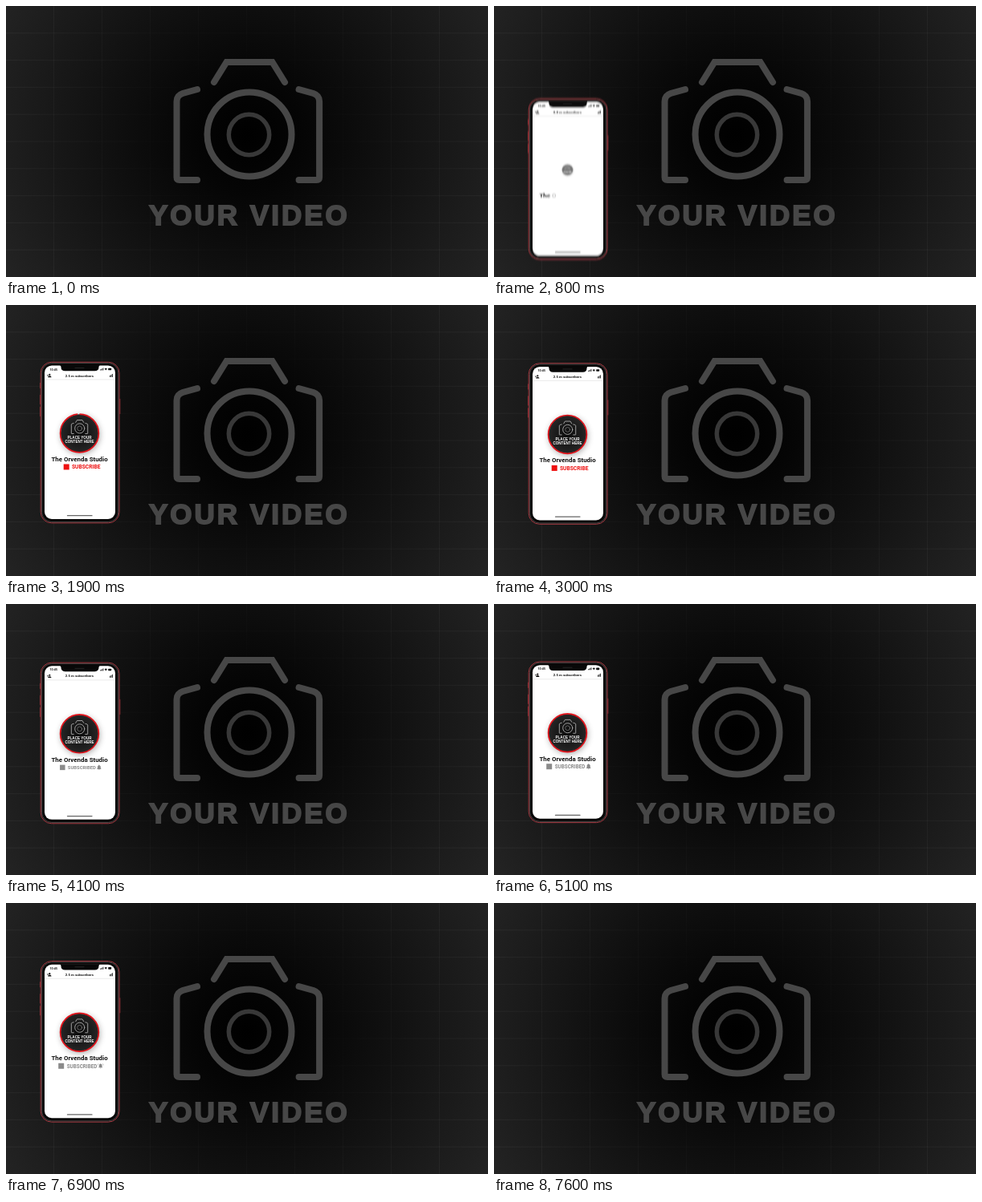
These frames come from a looping animation (600 px wide and 338 px high, 7900 ms). An HTML page:

```html
<!DOCTYPE html>
<html lang="en">
<head>
<meta charset="utf-8">
<title>Subscribe phone</title>
<style>
  html, body { margin: 0; width: 100%; height: 100%; overflow: hidden; background: #000; }
  svg { display: block; width: 600px; height: 338px; }
  .ui { font-family: Roboto, sans-serif; font-weight: 700; }
  .sans { font-family: "Liberation Sans", Arial, sans-serif; font-weight: 700; }
</style>
</head>
<body>
<svg viewBox="0 0 600 338">
  <defs>
    <radialGradient id="vignette" gradientUnits="userSpaceOnUse" cx="301" cy="161" r="345">
      <stop offset="0" stop-color="#000"/>
      <stop offset=".2" stop-color="#050505"/>
      <stop offset=".5" stop-color="#101010"/>
      <stop offset="1" stop-color="#232323"/>
    </radialGradient>
    <radialGradient id="gridFade" gradientUnits="userSpaceOnUse" cx="301" cy="161" r="345">
      <stop offset=".2" stop-color="#fff" stop-opacity="0"/>
      <stop offset="1" stop-color="#fff" stop-opacity=".05"/>
    </radialGradient>
    <radialGradient id="disc">
      <stop offset="0" stop-color="#0a0a0a"/>
      <stop offset="1" stop-color="#262626"/>
    </radialGradient>
    <filter id="motionBlur" x="-10%" y="-10%" width="120%" height="120%">
      <feGaussianBlur id="blur" stdDeviation="0 1"/>
    </filter>
    <filter id="soft" x="-50%" y="-50%" width="200%" height="200%">
      <feGaussianBlur stdDeviation="4"/>
    </filter>
    <g id="camera" fill="none" stroke-width="8" stroke-linecap="round">
      <path d="M259 95L274.5 70H331.5L347 95"/>
      <path id="side" d="M238 104L220 109Q212.5 111.5 212.5 119V213.5Q212.5 217 216 217H238"/>
      <use href="#side" transform="matrix(-1 0 0 1 602.6 0)"/>
      <circle cx="303" cy="160" r="52.5"/>
      <circle cx="302.5" cy="160.5" r="25.2" stroke-width="5.5" opacity=".8"/>
    </g>
    <path id="bell" d="M-3 2.2L-2.1 1V-1A2.1 2.1 0 0 1 -.6 -2.9A.6 .6 0 0 1 .6 -2.9A2.1 2.1 0 0 1 2.1 -1V1L3 2.2ZM-.8 2.7H.8A.8 .8 0 0 1 -.8 2.7Z"/>
  </defs>

  <rect width="600" height="338" fill="url(#vignette)"/>
  <path id="grid" stroke="url(#gridFade)" fill="none"/>
  <use href="#camera" stroke="#474747"/>
  <text class="sans" x="178" y="273" font-size="35" letter-spacing="3" fill="#474747" stroke="#474747" stroke-width="1.8">YOUR VIDEO</text>

  <g id="phone">
    <path d="M42.5 97V104M42.5 112V124M42.5 127V139M141.8 117V136" stroke="#8f2f36"/>
    <rect x="43.2" y="71.3" width="97.8" height="200.6" rx="13.5" fill="#080808" stroke="#a63a42"/>
    <rect x="44.5" y="72.6" width="95.2" height="198" rx="12.3" fill="none" stroke="#8b8080" stroke-width=".5"/>
    <rect x="48" y="75.5" width="88" height="191.5" rx="9" fill="#fff"/>
    <path d="M67 75H117Q115.500 75.500 115.500 77.500Q115.500 82.300 110.500 82.300H73.500Q68.500 82.300 68.500 77.500Q68.500 75.500 67 75Z" fill="#080808"/>
    <path d="M86 78.500H97" stroke="#242424" stroke-width="1" stroke-linecap="round"/>
    <g class="ui" fill="#111">
      <text x="54.500" y="81.600" font-size="3.700">10:45</text>
      <path d="M117.500 81.500V80.500M118.700 81.500V79.900M119.900 81.500V79.200M121 81.500V78.500" stroke="#111" stroke-width=".8"/>
      <path d="M122.700 79.500Q124.300 78 125.900 79.500L124.300 81.600Z"/>
      <rect x="127.200" y="78.800" width="4" height="2.600" rx=".7"/>
      <circle cx="54.300" cy="86.900" r="1.100"/>
      <path d="M52 90.200Q52.300 88.300 54.300 88.300T56.600 90.200Z"/>
      <path d="M51 87.800H53M52 86.800V88.800" stroke="#111" stroke-width=".5"/>
      <path d="M129.600 90V87.800M131 90V87M132.400 90V86" stroke="#111" stroke-width=".9"/>
      <text id="count" x="91.300" y="89.600" font-size="4.350" text-anchor="middle"></text>
      <text id="title" x="91.500" y="194.800" font-size="7.900" text-anchor="middle"></text>
    </g>
    <path d="M48 93H136" stroke="#ddd" stroke-width=".6"/>

    <g id="avatar">
      <circle cx="1" cy="2" r="23.500" fill="#000" opacity=".4" filter="url(#soft)"/>
      <circle r="23.600" fill="url(#disc)"/>
      <use href="#camera" stroke="#aaa" transform="translate(0 -8) scale(.115) translate(-301 -143)"/>
      <g class="sans" font-size="4.600" fill="#fff" text-anchor="middle">
        <text y="7.500">PLACE YOUR</text>
        <text y="12.300">CONTENT HERE</text>
      </g>
    </g>
    <circle id="ring" cx="91.500" cy="160" r="23.900" fill="none" stroke="#e3131b" stroke-width="1.700" pathLength="100" transform="rotate(-90 91.500 160)"/>

    <g id="row" class="ui">
      <g id="ask" fill="#ee1111">
        <rect x="-20" y="-3.500" width="7" height="7"/>
        <text x="-9.800" y="2.400" font-size="6.700">SUBSCRIBE</text>
      </g>
      <g id="done" fill="#8a8a8a">
        <rect x="-26.500" y="-3.500" width="7" height="7"/>
        <text x="-16" y="2.300" font-size="6.320">SUBSCRIBED</text>
        <g transform="translate(26 0)">
          <use id="ringer" href="#bell"/>
          <path id="waves" d="M-2.700 -2.800Q-3.400 -2 -3.400 -.8M2.700 -2.800Q3.400 -2 3.400 -.8" fill="none" stroke="#8a8a8a" stroke-width=".6"/>
        </g>
      </g>
    </g>
    <path d="M76.500 262.700H107" stroke="#666" stroke-width="1.300" stroke-linecap="round"/>
  </g>
</svg>
<script>
const LOOP = 7900, STEP = 100, TRAVEL = 270;
const $ = id => document.getElementById(id);
const set = (id, name, value) => $(id).setAttribute(name, value);
const part = (t, from, to) => Math.min(1, Math.max(0, (t - from) / (to - from)));
const smooth = p => p * p * (3 - 2 * p);

let lines = "";
for (let i = 1; i < 10; i++) lines += `M${i * 60 - .5} 0V338M0 ${i * 33.8}H600`;
set("grid", "d", lines);

$("title").innerHTML = [..."The Orvenda Studio"].map(c => `<tspan>${c}</tspan>`).join("");
const letters = [...$("title").children];

const slide = t => TRAVEL * ((1 - part(t, 223, 1500)) ** 3 + part(t, 6800, 7550) ** 2.65);
const bob = t => .8 - 1.15 * Math.cos((t - 1300) / 796);

function draw(t) {
  const shown = t >= 300 && t < 7600;
  set("phone", "visibility", shown ? "visible" : "hidden");
  if (!shown) return;

  set("phone", "transform", `translate(0 ${(slide(t) + bob(t)).toFixed(2)})`);
  const speed = Math.abs(slide(t + 10) - slide(t - 10)) / 20;
  set("blur", "stdDeviation", `0 ${Math.max(.01, speed * 5)}`);
  set("phone", "filter", speed > .04 ? "url(#motionBlur)" : "none");

  $("count").textContent = (2.5 * part(t, 300, 1800)).toFixed(1) + " m subscribers";
  letters.forEach((letter, i) =>
    letter.setAttribute("fill-opacity", part((t - 600) / 40 - i, 0, 4)));

  const grow = smooth(part(t, 550, 1250));
  set("avatar", "transform", `translate(91.5 160) scale(${grow})`);
  set("avatar", "opacity", part(t, 500, 1000));

  const drawn = 100 * (1 - (1 - part(t, 1200, 2000)) ** 2);
  set("ring", "stroke-dasharray", drawn >= 100 ? "none" : `${drawn} 200`);
  set("ring", "visibility", shown && drawn > 0 ? "visible" : "hidden");

  const press = 1 - .1 * Math.sin(Math.PI * part(t, 3800, 4200));
  set("row", "transform", `translate(91.7 202) scale(${press})`);
  set("row", "opacity", part(t, 1200, 1600));
  const subscribed = t >= 4000;
  set("ask", "display", subscribed ? "none" : "inline");
  set("done", "display", subscribed ? "inline" : "none");

  const swing = part(t, 5500, 6300);
  set("ringer", "transform", `rotate(${18 * Math.sin(swing * 6 * Math.PI) * (1 - swing)}) scale(${t < 5700 ? 1 : .88})`);
  set("waves", "display", t < 5700 ? "none" : "inline");
}

function tick() {
  draw(Math.floor(performance.now() % LOOP / STEP) * STEP);
  requestAnimationFrame(tick);
}
tick();
</script>
</body>
</html>
```
